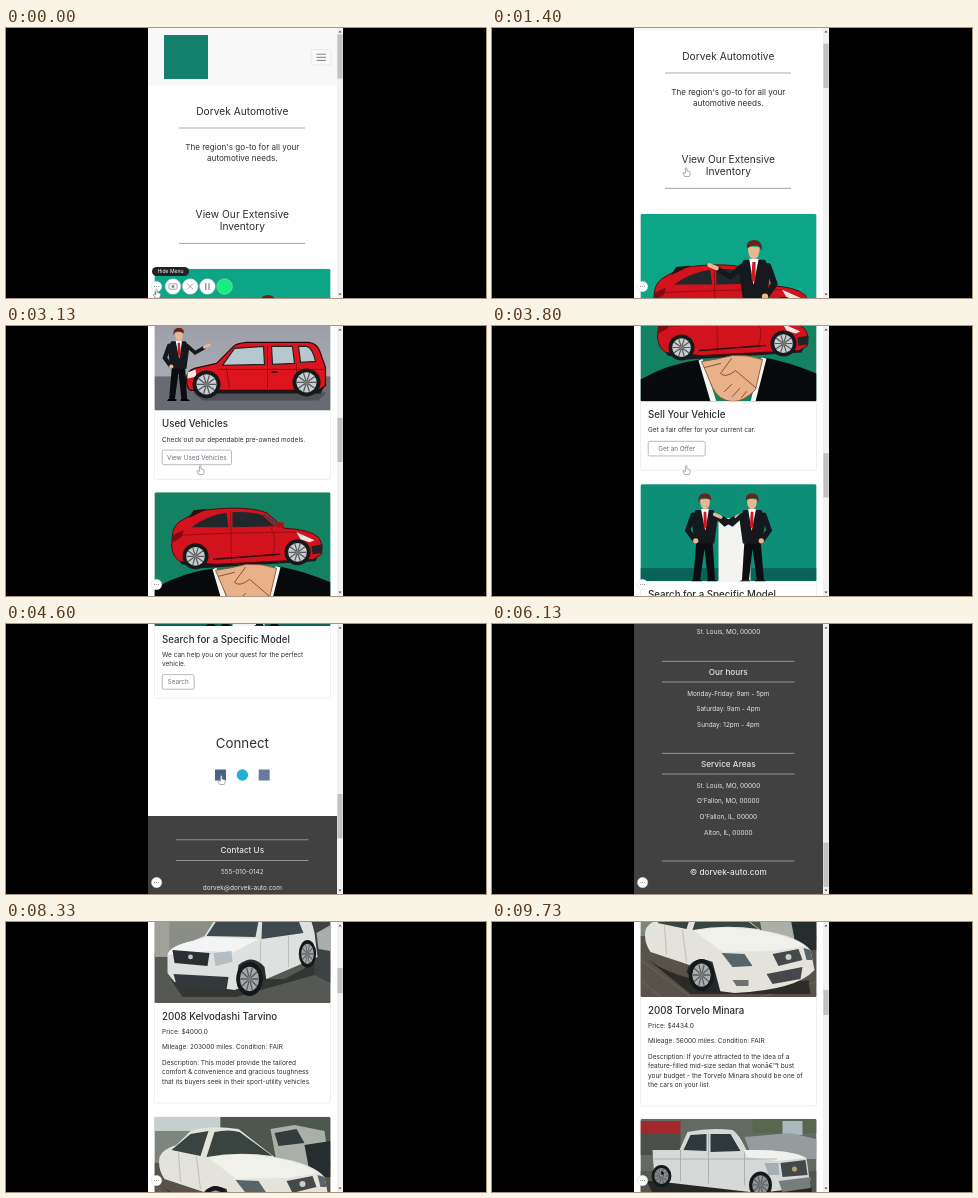
Animation of 480 by 270 pixels, one loop 9790 ms. Source, as an HTML page:

```html
<!DOCTYPE html>
<html lang="en">
<head>
<meta charset="utf-8">
<title>Car dealer page</title>
<style>
  html, body { margin: 0; width: 100%; height: 100%; overflow: hidden; background: #000; }
  svg { display: block; width: 100vw; height: 100vh; }
  text { font-family: Inter, "Open Sans", sans-serif; }
</style>
</head>
<body>
<svg id="stage" viewBox="0 0 480 270"></svg>
<script>
const LOOP = 9790, STEP = 1000 / 15, CUT = 6190;
const INK = '#2a2e32', GREY = '#6c757d';

// ---- drawing helpers ----
const rect = (x, y, w, h, fill, more = '') =>
  `<rect x="${x}" y="${y}" width="${w}" height="${h}" fill="${fill}" ${more}/>`;
const circle = (x, y, r, fill, more = '') =>
  `<circle cx="${x}" cy="${y}" r="${r}" fill="${fill}" ${more}/>`;
const path = (d, fill, more = '') => `<path d="${d}" fill="${fill}" ${more}/>`;
const line = (d, color, w = 1) =>
  path(d, 'none', `stroke="${color}" stroke-width="${w}" stroke-linecap="round"`);
const group = (x, y, body, sx = 1, sy = Math.abs(sx)) =>
  `<g transform="translate(${x} ${y}) scale(${sx} ${sy})">${body}</g>`;
const text = (x, mid, s, size, fill = INK, more = '') =>
  `<text x="${x}" y="${mid + size * 0.36}" font-size="${size}" fill="${fill}" ${more}>${s}</text>`;
const center = (mid, s, size, fill, more = '') =>
  text(236.3, mid, s, size, fill, 'text-anchor="middle" ' + more);
const rule = (x, y, w, color) => rect(x, y - 0.4, w, 0.8, color);

// A wheel seen at an angle has squash < 1.
function wheel(x, y, r, squash = 1, rim = '#c9cccd') {
  let spokes = '';
  for (let i = 0; i < 10; i++) {
    const a = i * Math.PI / 5;
    spokes += `M0 0L${(r * 0.66 * Math.cos(a)).toFixed(2)} ${(r * 0.66 * Math.sin(a)).toFixed(2)}`;
  }
  return group(x, y, circle(0, 0, r, '#16191b') + circle(0, 0, r * 0.72, rim) +
    line(spokes, '#55595c', r * 0.09) + circle(0, 0, r * 0.18, '#777'), squash, 1);
}

const hatchback =
  path('M6 50L148 46L144 55L30 62L10 58Z', '#181a1c') +
  path('M1 27Q3 17 12 13L26 5Q50 1 70 2Q88 3 96 7L113 22Q138 23 147 31Q152 38 150 48L142 53L44 58L8 55Q1 50 0 40Z',
    '#d2121c', 'stroke="#4a080d" stroke-width=".9"') +
  path('M20 21Q36 9 55 6.5L57 21Z M61 6Q80 5 91 9L103 20L61 21Z', '#20282c') +
  path('M94 8L110 21L106 21L91 8Z', '#39454a') +
  path('M22 4L36 2.5L29 6L17 12Z', '#2a1013') +
  line('M59 5L60 55M100 22Q106 34 101 50M8 29Q60 26 124 26', '#8c0c14', 0.8) +
  line('M42 53L108 48', '#2a0d10', 1.6) +
  path('M125 26L143 34L138 36L129 33Z', '#f3e7e4') + path('M1 29L12 24L10 31L1 36Z', '#7d0b12') +
  path('M105 16L112 16L112 21L105 21Z', '#ad0f18') + path('M140 40L151 38L150 47L141 48Z', '#202225') +
  wheel(24, 50, 13) + wheel(126, 46, 13);

const compact =
  path('M6 44H138L134 51H10Z', '#17191b') +
  path('M0 36Q0 29 8 26L30 21L47 4Q50 1 60 0L122 0Q130 1 133 8L139 25V43L132 48H4Q0 46 0 36Z',
    '#dd141e', 'stroke="#2b0609" stroke-width="1.2"') +
  path('M36 23L48 6L77 4L78 22Z M85 4H106L108 21L86 22Z M112 4H120Q126 5 129 19L114 20Z', '#b4c8ce',
    'stroke="#222" stroke-width="1.2"') +
  line('M81 3V46M40 26L43 46M110 22V34M32 27H137', '#7a0a10', 0.8) +
  path('M1 30L9 27L10 34L1 36Z', '#f1ece4') + rect(85, 29, 6, 1.6, '#4a080d') +
  wheel(20, 42, 14) + wheel(120, 40, 14);

// About 100 units tall, standing on y = 100, one arm out to the side.
const man =
  path('M-9 50H9L12 98H4L0 62L-5 98H-13Z', '#0c0d10') +
  path('M-14 98H-3V101H-16Z M3 98H13L16 101H3Z', '#000') +
  path('M-10 18H10L15 27L11 56H-11L-15 28Z', '#15181d') +
  path('M-4 17H5L1 42Z', '#fff') + path('M-1 20H2L3 36L0 40L-1 35Z', '#cf1822') +
  line('M-13 24L-19 41L-11 52', '#15181d', 6) + line('M12 24L23 34L35 27', '#15181d', 5) +
  line('M36 26L43 23', '#e9b78f', 4) + circle(-10, 53, 3, '#e9b78f') +
  path('M-5 6Q-5 17 1 17.5Q7 16 6 5Z', '#e9b78f') +
  path('M-7 9Q-8 -1 1 -1Q9 0 7 7Q1 3 -4 5Z', '#6b2218');

// ---- card pictures, each 176 wide ----
const showroom = rect(0, 0, 176, 133, '#0da587') + rect(0, 95, 176, 38, '#07594c') +
  group(13, 49, hatchback, 1.03) + group(114, 27, man, -1.05);

const usedLot = rect(0, 0, 176, 124, 'url(#haze)') + rect(0, 90, 176, 34, '#686c72') +
  path('M38 106H172L164 114H48Z', '#4d5055') +
  group(32, 56, compact) + group(24, 42, man, 0.72);

const handshake = rect(0, 0, 176, 118, '#128262') + group(17, 14, hatchback) +
  path('M0 118V96Q28 80 60 76L76 118Z', '#08090a') +
  path('M176 118V90Q150 79 124 74L110 118Z', '#08090a') +
  path('M58 77L62 75.5L76 118H70Z M126 75L121 74L110 118H115Z', '#f4f4f2') +
  path('M61 78Q76 76 92 72Q108 71 122 76L115 106Q104 118 92 118Q78 117 72 104Z', '#e8b18a',
    'stroke="#7c4a2e" stroke-width=".8"') +
  line('M91 75L80 90Q85 95 95 87L115 104M84 108L91 101M92 113L99 105M101 114L106 108M64 84L80 80', '#7c4a2e', 0.9);

const search = rect(0, 0, 176, 97, '#0d8e77') + rect(0, 84, 176, 13, '#086456') +
  rect(78, 34, 32, 63, '#f3f3f1') + group(64, 10, man, 0.88) + group(112, 10, man, -0.88);

const suvPhoto = rect(0, 0, 176, 132, '#8b8d87') + rect(0, 82, 176, 50, '#565853') +
  rect(0, 40, 15, 46, '#a0a198') + path('M148 50L176 44V112L160 104Z', '#3d4244') +
  path('M162 62L176 54V80L164 78Z', '#a9aeac') +
  path('M16 108H130L160 92V104L82 126H28Z', '#343633') +
  path('M13 84Q15 75 38 70L50 65L66 40Q74 30 140 32Q154 34 160 62L163 86L112 108L80 119L20 111L13 102Z', '#dfe1e0') +
  path('M13 84Q15 75 38 70L52 66L104 68L78 82L56 80Z', '#f3f4f3') +
  path('M52 65L68 41L106 40L101 66Z M108 40L140 40L149 62L107 68Z', '#3f494e') +
  path('M18 79L55 82L53 95L20 92Z', '#2c2f31') + circle(36, 86, 2.4, '#c3c7c8') +
  path('M59 82L77 80L78 91L61 95Z', '#b3bdc2') + path('M19 103L74 106L72 119L22 114Z', '#33383a') +
  line('M106 70V104M134 65V96', '#b2b6b5', 0.8) + path('M84 94Q98 82 110 96L112 110H82Z', '#2b2e2f') +
  wheel(95, 108, 17, 0.78, '#a3a7a8') + wheel(153, 83, 14, 0.62, '#a3a7a8');

const sedanPhoto = rect(0, 0, 176, 107, '#7c857e') + rect(0, 0, 66, 14, '#c6d0cf') +
  rect(66, 0, 110, 50, '#4d574e') + rect(0, 46, 176, 61, '#57524a') +
  line('M0 70L50 107M0 90L20 107M120 107L176 92', '#726c62', 0.8) +
  path('M116 12L140 8L170 14L176 56H124Z', '#aab0a8') + path('M120 16L142 12L150 26L124 29Z', '#343d3d') +
  path('M150 28L176 24V60H156Z', '#262d2e') +
  path('M8 70Q60 106 168 90L170 104H50Z', '#2c2b27') +
  path('M5 40Q8 32 22 28L36 14Q54 8 84 12L120 40Q158 46 170 60L174 80Q156 100 94 103L70 100L52 76L10 62Q3 52 5 40Z',
    '#e3e3db') +
  path('M54 41Q82 34 120 41Q150 46 164 56L132 61L82 62Z', '#f1f1eb') +
  path('M60 15Q74 12 85 15L118 39Q84 34 52 40Z M17 33L36 17L54 14L46 39Z', '#39433f') +
  path('M81 63L104 64L112 76L92 77Z M163 58L170 60L172 70L166 70Z', '#59646a') +
  path('M132 64L158 59L162 70L138 76Z', '#45494a') + circle(148, 67, 3, '#c9cdce') +
  path('M126 84L162 77L160 89L132 94Z', '#45474a') + path('M92 90L108 90L108 96L96 96Z', '#6d7070') +
  line('M42 40L46 72M24 36L26 64', '#b5b5ac', 0.8) + path('M46 82Q52 64 72 72L80 102H62Z', '#24262a') +
  wheel(61, 85, 16, 0.8, '#a9adae');

const truckPhoto = rect(0, 0, 176, 107, '#626a62') + rect(0, 2, 40, 12, '#a3262a') +
  rect(0, 14, 40, 22, '#4b4e49') + rect(112, 0, 64, 14, '#56694f') +
  rect(142, 2, 20, 14, '#a9b7be') + path('M104 18L150 14L176 20V40H112Z', '#949c9d') +
  rect(0, 52, 176, 55, '#55564f') + path('M6 62H170L172 78H14Z', '#242627') +
  path('M12 31H39L47 13Q70 8 92 11Q98 14 106 31Q150 30 166 39L170 68L118 74L14 62Z', '#d6d8d7') +
  path('M104 31Q150 30 166 39L138 42L106 38Z', '#eff0ef') +
  path('M43 31L50 16L66 15V32Z M70 15L90 15L100 32L70 33Z', '#2f383c') +
  line('M68 15V64M40 31V62M104 34V66M14 40H136', '#a2a6a6', 0.8) +
  path('M140 44L165 41L167 56L142 58Z', '#43484b') + circle(154, 50, 2.6, '#b3a06c') +
  path('M124 44L138 44L139 56L128 56Z', '#a5b0b5') + path('M138 62L170 58V69L142 73Z', '#777c7d') +
  wheel(21, 57, 11, 0.9, '#85898a') + wheel(120, 66, 13.5, 0.85, '#8f9394');

// ---- page parts ----
const header = rect(142, 0, 189, 57.5, '#f8f8f8') + rect(158, 7, 44, 44, '#12806b') +
  rect(305, 21.5, 20, 15.5, 'none', 'rx="2" stroke="#e2e2e2" stroke-width=".7"') +
  line('M311 26.2H319.5M311 29.3H319.5M311 32.4H319.5', '#777', 0.9);

const picture = (y, h, art, id) =>
  `<clipPath id="${id}"><rect width="176" height="${h}" rx="1.5"/></clipPath>` +
  `<g transform="translate(148.5 ${y})" clip-path="url(#${id})">${art}</g>`;

const card = (top, h, gap, art, id, title, lines) =>
  rect(148.5, top, 176, h + gap, '#fff', 'rx="1.5" stroke="#e8e8e8" stroke-width=".7"') +
  picture(top, h, art, id) + text(156, top + h + 13.5, title, 9.7, INK, 'font-weight="500"') +
  lines.map(([dy, s]) => text(156, top + h + dy, s, 6.5)).join('');

const button = (y, w, s, id = '') =>
  `<g id="${id}">` + rect(156.2, y, w, 14.6, '#fff', `rx="1.5" stroke="#9aa0a5" stroke-width=".7"`) +
  text(156.2 + w / 2, y + 7.4, s, 6.4, GREY, 'text-anchor="middle"') + '</g>';

const footerTitle = (mid, s) => rule(170, mid - 10.7, 132.5, '#a5a5a5') +
  center(mid, s, 8.2, '#e4e4e4', 'font-weight="500"') + rule(170, mid + 10, 132.5, '#a5a5a5');
const footerLines = (mid, ...list) =>
  list.map((s, i) => center(mid + i * 15.6, s, 6.4, '#e4e4e4')).join('');

const home = header +
  center(83, 'Dorvek Automotive', 10.2) + rule(173, 100, 126, '#9a9a9a') +
  center(119, "The region's go-to for all your", 8.1) + center(130.3, 'automotive needs.', 8.1) +
  center(186, 'View Our Extensive', 10.2) + center(198, 'Inventory', 10.2) + rule(173, 215.3, 126, '#8a8a8a') +
  card(241, 133, 77, showroom, 'pic1', 'New Vehicles', [[29, 'Be the envy of the neighborhood!']]) +
  button(414.3, 67.5, 'View New Vehicles', 'newBtn') +
  card(465.5, 124, 69, usedLot, 'pic2', 'Used Vehicles', [[29, 'Check out our dependable pre-owned models.']]) +
  button(629.2, 69.3, 'View Used Vehicles', 'usedBtn') +
  card(671.4, 117.6, 69, handshake, 'pic3', 'Sell Your Vehicle', [[29, 'Get a fair offer for your current car.']]) +
  button(829.2, 57, 'Get an Offer') +
  card(872, 97, 72, search, 'pic4', 'Search for a Specific Model',
    [[28.5, 'We can help you on your quest for the perfect'], [38, 'vehicle.']]) +
  button(1017.6, 32, 'Search') +
  center(1086, 'Connect', 13.3) +
  rect(209, 1112.5, 11, 11, '#4a6285') + circle(236.4, 1118, 5.7, '#1fb0d2') + rect(252.7, 1112.5, 11, 11, '#667a9d') +
  rect(142, 1159, 189, 365, '#414141') +
  footerTitle(1193.5, 'Contact Us') +
  footerLines(1215, '555-010-0142', 'dorvek@dorvek-auto.com', '100 Any Street', 'St. Louis, MO, 00000') +
  footerTitle(1302, 'Our hours') +
  footerLines(1323.5, 'Monday-Friday: 9am - 5pm', 'Saturday: 9am - 4pm', 'Sunday: 12pm - 4pm') +
  footerTitle(1394, 'Service Areas') +
  footerLines(1415.5, 'St. Louis, MO, 00000', "O'Fallon, MO, 00000", "O'Fallon, IL, 00000", 'Alton, IL, 00000') +
  rule(170, 1491, 132.5, '#a5a5a5') + center(1502, '© dorvek-auto.com', 8.2, '#e4e4e4', 'font-weight="500"');

const inventory = header +
  center(83, 'Used Vehicles', 10.2) + rule(173, 100, 126, '#9a9a9a') +
  center(119, 'Check out our dependable', 8.1) + center(130.3, 'pre-owned models.', 8.1) +
  card(361, 132, 100, suvPhoto, 'pic5', '2008 Kelvodashi Tarvino', [
    [28.3, 'Price: $4000.0'], [44, 'Mileage: 203000 miles. Condition: FAIR'],
    [59.5, 'Description: This model provide the tailored'],
    [69, 'comfort &amp; convenience and gracious toughness'],
    [78.5, 'that its buyers seek in their sport-utility vehicles.']]) +
  card(607, 107, 109, sedanPhoto, 'pic6', '2008 Torvelo Minara', [
    [28.3, 'Price: $4434.0'], [44, 'Mileage: 56000 miles. Condition: FAIR'],
    [59.5, "Description: If you're attracted to the idea of a"],
    [69, 'feature-filled mid-size sedan that wonâ€™t bust'],
    [78.5, 'your budget - the Torvelo Minara should be one of'],
    [88, 'the cars on your list.']]) +
  card(836, 107, 100, truckPhoto, 'pic7', '', []);

const tool = (icon, fill = '#fff') =>
  `<g class="tool">${circle(0, 0, 7.8, fill, 'stroke="#ccc" stroke-width=".5"')}${icon}</g>`;
const recorder = '<g id="tools">' +
  tool(rect(-4, -2.7, 8, 5.4, 'none', 'rx="1" stroke="#888" stroke-width=".8"') + circle(0, 0, 1.5, '#888')) +
  tool(line('M-2.7 -2.7L2.7 2.7M2.7 -2.7L-2.7 2.7', '#888', 0.8)) +
  tool(line('M-1.6 -3V3M1.6 -3V3', '#666', 1)) + tool('', '#16ef7b') +
  rect(146, 239, 37, 9, '#222', 'rx="4.5"') +
  text(164.5, 243.4, 'Hide Menu', 5.1, '#fff', 'text-anchor="middle"') + '</g>' +
  circle(150.6, 258.5, 5.2, '#fff', 'stroke="#ccc" stroke-width=".4"') +
  [148.7, 150.6, 152.5].map(x => circle(x, 258.5, 0.55, '#888')).join('');

const $ = id => document.getElementById(id);
$('stage').innerHTML =
  '<defs><linearGradient id="haze" x2="0" y2="1"><stop stop-color="#93969f"/><stop offset="1" stop-color="#b0b3bc"/></linearGradient>' +
  '<clipPath id="column"><rect x="142" width="195" height="270"/></clipPath></defs>' +
  rect(0, 0, 480, 270, '#000') + '<g clip-path="url(#column)">' + rect(142, 0, 195, 270, '#fff') +
  `<g id="home">${home}</g><g id="inventory">${inventory}</g>` +
  rect(331, 0, 6, 270, '#f1f1f1') + rect(331.4, 6, 5.2, 44, '#c1c1c1', 'id="thumb"') +
  path('M332.4 4.4L334 2.4L335.6 4.4Z M332.4 265.6L334 267.6L335.6 265.6Z', '#555') + recorder +
  '<g id="hand">' + path('M-.8 .7Q0 -.6 .8 .7V3.4L3.6 4.3Q4.4 5 3.8 7L3 9H-1.4L-3.4 5.6Q-3 4.4 -.8 5.9Z',
    '#fff', 'stroke="#777" stroke-width=".6"') + '</g>' +
  path('M169 247.5V254L170.5 252.7L171.6 255L172.6 254.5L171.6 252.3H173.6Z', '#000',
    'id="arrow" stroke="#fff" stroke-width=".4"') + '</g>';

// ---- motion ----
const clamp = v => Math.min(1, Math.max(0, v));
const ease = v => (v = clamp(v)) * v * (3 - 2 * v);

// Smooth curve through [time, value] keys, at rest at both ends.
function glide(keys, t) {
  const n = keys.length - 1;
  if (t <= keys[0][0]) return keys[0][1];
  if (t >= keys[n][0]) return keys[n][1];
  const slope = i => i === 0 || i === n ? 0 :
    (keys[i + 1][1] - keys[i - 1][1]) / (keys[i + 1][0] - keys[i - 1][0]);
  const i = keys.findIndex(k => k[0] > t) - 1;
  const [t0, a] = keys[i], [t1, b] = keys[i + 1], d = t1 - t0, u = (t - t0) / d, e = u * u * (3 - 2 * u);
  return a + (b - a) * e + d * (slope(i) * u * (1 - u) ** 2 - slope(i + 1) * u * u * (1 - u));
}

const homeScroll = [[900, 0], [2333, 288], [3133, 505], [4600, 967], [5600, 1254]];
const listScroll = [[6670, 0], [8333, 412], [9530, 639]];
const tools = [...document.querySelectorAll('.tool')];
const show = (id, on) => $(id).setAttribute('display', on ? 'inline' : 'none');

function hover(id, y, w, px, py) {
  const on = px > 156 && px < 156 + w && py > y && py < y + 14.6;
  const [box, label] = $(id).children;
  box.setAttribute('fill', on ? GREY : '#fff');
  label.setAttribute('fill', on ? '#fff' : GREY);
}

function draw(ms) {
  const t = Math.floor((ms + 5) / STEP) * STEP, first = t < CUT;
  const y = glide(first ? homeScroll : listScroll, t), full = first ? 1524 : 2680;
  show('home', first);
  show('inventory', !first);
  $(first ? 'home' : 'inventory').setAttribute('transform', `translate(0 ${-y})`);
  $('thumb').setAttribute('y', 6.3 + y * 258 / full);
  $('thumb').setAttribute('height', 250 * 270 / full);

  const shut = ease((t - 10) / 320);
  show('tools', shut < 1);
  $('tools').setAttribute('opacity', 1 - shut);
  tools.forEach((el, i) =>
    el.setAttribute('transform', `translate(${150.6 + (16.4 + i * 17.2) * (1 - shut)} 258.5)`));

  const a = ease((t - 730) / 470), b = ease((t - 3900) / 600);
  const px = 150.6 + 43.6 * a + 21 * b, py = 261 - 121.5 * a + 12 * b;
  $('hand').setAttribute('transform', `translate(${px} ${py})`);
  show('hand', t < 5000);
  show('arrow', t > 9650);
  hover('newBtn', 414.3, 67.5, px, py + y);
  hover('usedBtn', 629.2, 69.3, px, py + y);
}

const start = performance.now();
(function tick() {
  draw((performance.now() - start) % LOOP);
  requestAnimationFrame(tick);
})();
</script>
</body>
</html>
```
